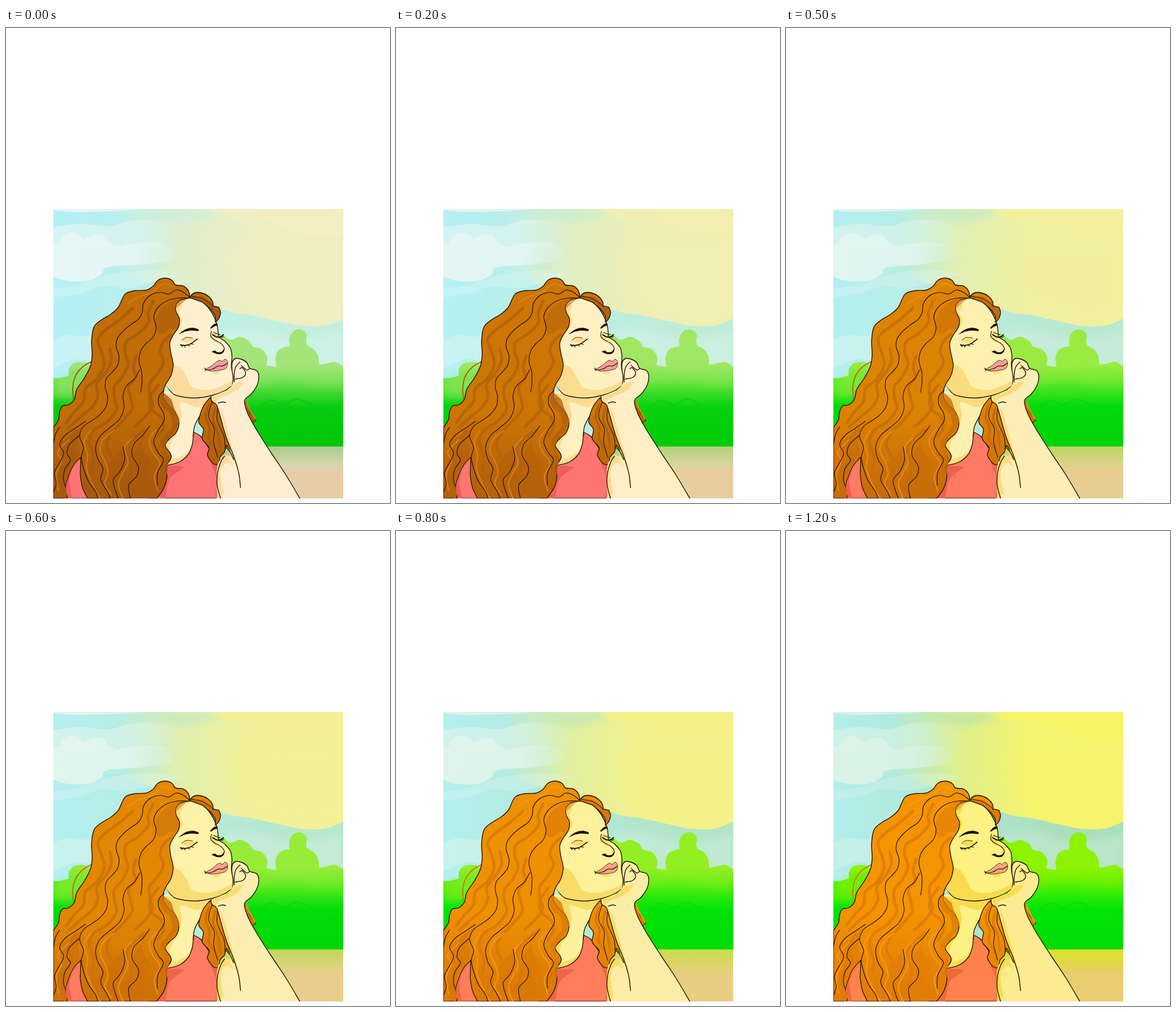
Animation, 673 px wide and 832 px high, one loop 3.2 s. Source, as an HTML page:

```html
<!DOCTYPE html>
<html lang="en">
<head>
<meta charset="utf-8">
<title>Sunlit portrait</title>
<style>
  html, body { margin: 0; width: 100%; height: 100%; overflow: hidden; background: #fff; }
  svg { display: block; width: 673px; height: 832px; }
</style>
</head>
<body>
<svg viewBox="0 0 673 832">
  <defs>
    <clipPath id="frame"><rect x="83" y="317" width="508" height="507"/></clipPath>
    <filter id="soft" x="-20%" y="-40%" width="140%" height="180%"><feGaussianBlur stdDeviation="7"/></filter>
  </defs>
  <g id="scene" clip-path="url(#frame)"></g>
</svg>
<script>
const NS = 'http://www.w3.org/2000/svg';
const LOOP = 3200, STEP = 100, STEPS = 12;

// name: cool colour, warm colour, share of the fade at which the warm one is reached
const palette = {
  skyLeft: ['#b5f0f5', '#b3eeec', 1],
  skyRight: ['#c3efdf', '#aadfbb', 1],
  warm: ['#eeeec3', '#f5f46e', 1],
  warmLight: ['#f4eec3', '#f8f365', 1],
  cloud: ['#e9f7f5', '#ddf3e6', 1],
  leafTop: ['#a3e578', '#8df204', 0.9],
  leafMid: ['#5ede42', '#42ef05', 0.8],
  leaf: ['#08cc10', '#00e408', 0.7],
  leafLow: ['#00c60a', '#00dc06', 0.7],
  groundTop: ['#a9cb8b', '#d9e32e', 1],
  groundMid: ['#d6d6ad', '#e3d153', 1],
  ground: ['#e6cda7', '#e9cd70', 1],
  hair: ['#c26d05', '#f39400', 0.75],
  hairLow: ['#a8590c', '#e17d05', 0.75],
  streak: ['#a65b10', '#dc7a0a', 0.75],
  glint: ['#d3801f', '#fa9f16', 0.75],
  skin: ['#fef0cd', '#fdf183', 1],
  arm: ['#feeecf', '#fbec92', 1],
  shade: ['#fbdc9c', '#f8dc4e', 1],
  shirt: ['#ff7477', '#ff824c', 1],
  shirtShade: ['#ee5b5e', '#ee6a39', 1],
  lips: ['#f49c9b', '#f6a97d', 1]
};

const rgb = hex => [1, 3, 5].map(i => parseInt(hex.slice(i, i + 2), 16));

function mix([from, to, full], p) {
  const end = rgb(to), k = Math.min(1, p / full);
  return `rgb(${rgb(from).map((v, i) => Math.round(v + (end[i] - v) * k))})`;
}

const paint = name => !name ? 'none' : name in palette ? `var(--${name})` : name;
const scene = document.getElementById('scene');

function add(tag, attrs, parent = scene) {
  const el = document.createElementNS(NS, tag);
  for (const key in attrs) el.setAttribute(key, attrs[key]);
  parent.append(el);
  return el;
}

// Smooth curve through points; "/" makes a corner
function curve(text) {
  return text.split('/').map((part, n) => {
    const p = part.trim().split(/\s+/).map(s => s.split(',').map(Number));
    const at = i => p[Math.max(0, Math.min(p.length - 1, i))];
    let d = (n ? 'L' : 'M') + p[0];
    for (let i = 0; i < p.length - 1; i++) {
      const c1 = at(i).map((v, k) => v + (at(i + 1)[k] - at(i - 1)[k]) / 6);
      const c2 = at(i + 1).map((v, k) => v - (at(i + 2)[k] - at(i)[k]) / 6);
      d += `C${c1} ${c2} ${at(i + 1)}`;
    }
    return d;
  }).join('');
}

function shape(fill, points, opacity = 1, outline = 0, filter = '') {
  return add('path', {
    d: curve(points) + 'Z', opacity,
    style: `fill:${paint(fill)};stroke:${outline ? INK : 'none'};stroke-width:${outline}`,
    ...(filter && { filter })
  });
}

const INK = '#201000';
function line(points, width = 1.4, color = INK, opacity = 1) {
  add('path', {
    d: curve(points), opacity, 'stroke-linecap': 'round', 'stroke-linejoin': 'round',
    style: `fill:none;stroke:${paint(color)};stroke-width:${width}`
  });
}
const lines = (list, ...look) => list.forEach(points => line(points, ...look));

function gradient(id, box, stops) {
  const [x1, y1, x2, y2] = box;
  const g = add('linearGradient', { id, x1, y1, x2, y2, gradientUnits: 'userSpaceOnUse' },
    document.querySelector('defs'));
  stops.forEach(([offset, color, alpha = 1]) =>
    add('stop', { offset, style: `stop-color:${paint(color)};stop-opacity:${alpha}` }, g));
}

gradient('sky', [83, 0, 480, 0], [[0, 'skyLeft'], [1, 'skyRight']]);
gradient('haze', [190, 0, 440, 0], [[0, 'warm', 0], [0.45, 'warm', 0.7], [1, 'warm']]);
gradient('mist', [83, 0, 310, 0], [[0, 'cloud'], [0.6, 'cloud', 0.9], [1, 'cloud', 0]]);
gradient('leaves', [0, 530, 0, 733], [[0, 'leafTop'], [0.3, 'leafTop'], [0.47, 'leafMid'], [0.66, 'leaf'], [1, 'leafLow']]);
gradient('land', [0, 733, 0, 776], [[0, 'groundTop'], [0.75, 'groundMid'], [1, 'ground']]);
gradient('locks', [0, 560, 0, 800], [[0, 'hair'], [0.45, 'hair'], [1, 'hairLow']]);

function drawSky() {
  add('rect', { x: 83, y: 317, width: 508, height: 507, fill: 'url(#sky)' });
  shape('url(#haze)', '190,317 / 591,317 / 591,509 560,521 520,522 480,514 430,503 400,499 370,489 330,466 280,455 230,440 190,420');
  shape('warmLight', '358,317 380,330 410,335 445,332 478,344 515,361 550,367 591,364 / 591,317', 0.75);
  shape('warmLight', '380,400 430,378 500,384 591,374 / 591,500 530,512 450,492 400,462', 0.35, 0, 'url(#soft)');
  shape('skyRight', '215,317 270,330 310,342 350,333 372,331 / 360,317', 0.5, 0, 'url(#soft)');
  shape('url(#mist)', '83,319 120,322 180,321 245,318 / 83,317');
  shape('url(#mist)', '83,349 130,343 180,347 230,336 290,342 330,360 / 300,384 210,381 / 83,386', 0.6);
  shape('url(#mist)', '83,379 92,377 99,365 114,358 128,362 137,370 151,363 169,363 180,376 196,382 220,378 270,377 300,391 / 290,406 240,414 178,419 168,431 148,442 122,444 98,441 83,435', 0.95);
  shape('cloud', '83,456 130,449 190,430 255,424 310,431 / 270,441 215,456 170,452 130,465 83,472', 0.3);
  shape('cloud', '83,546 108,538 145,540 190,530 / 190,600 130,580 83,596', 0.4);
  shape('cloud', '380,529 430,528 510,545 591,531 / 591,600 380,600', 0.3, 0, 'url(#soft)');
}

function drawPark() {
  shape('url(#leaves)', '83,613 94,613 110,609 / 110,597 117,588 130,585 143,587 152,596 / 200,733 83,733');
  shape('url(#leaves)', '350,545 375,536 393,546 410,541 426,548 433,558 449,563 458,577 456,591 / 474,594 / 472,579 477,565 488,559 497,558 / 496,546 499,537 507,529 519,529 527,537 526,549 528,556 / 540,563 547,574 549,590 / 561,588 577,585 591,593 / 591,733 350,733');
  shape('leafTop', '83,626 105,610 140,615 160,632 125,646 83,647', 0.55, 0, 'url(#soft)');
  shape('leafTop', '440,605 490,590 591,598 / 591,628 540,626 490,616 440,628', 0.35, 0, 'url(#soft)');
  lines(['445,663 465,652 486,660 510,650 534,660', '500,690 525,681 550,686 582,675'], 3, 'leafLow', 0.5);
  add('rect', { x: 83, y: 733, width: 508, height: 91, fill: 'url(#land)' });
}

function drawBody() {
  line('151,584 135,593 122,609 117,630 119,654', 2, 'streak');
  shape('hairLow', '414,650 423,661 428,674 438,687 433,691 437,706 / 417,672', 1, 1);
  line('421,655 427,669 436,684', 2.5, 'glint');

  // Neck and chest
  shape('skin', '270,636 / 362,640 345,670 331,700 328,735 310,756 280,768 / 265,740');
  shape('shade', '280,640 302,645 340,649 360,644 / 355,654 335,664 306,656 308,680 299,711 290,724 285,746 / 270,730');
  shape('shade', '330,708 322,737 307,750 283,758 / 283,768 310,762 325,744');
  line('358,648 344,672 331,696 328,715', 1.4);

  // Top
  shape('shirt', '329,708 341,715 355,735 368,754 374,780 371,824 / 255,824 / 283,766 304,760 320,746 327,728', 1, 1.3);
  shape('shirtShade', '283,768 298,767 313,769 / 303,776 287,790 281,812 279,824 / 258,824');
  shape('shirtShade', '353,735 365,750 374,775 371,824 / 367,824 369,790 360,765');

  // Hair behind the shoulder
  shape('url(#locks)', '357,648 346,662 340,678 338,691 346,703 344,720 356,735 353,748 363,763 373,764 375,752 383,743 / 386,731 396,743 / 391,725 383,700 378,661', 1, 1.3);
  lines(['356,659 350,680 357,701 355,718 367,739', '367,665 363,686 371,708 375,735'], 4, 'streak');
  lines(['361,655 355,680 365,702 364,725 371,752', '372,659 370,686 382,715 384,737'], 1.1);

  // Arm and fist
  shape('arm', '359,650 369,661 375,679 386,717 399,750 / 382,753 374,768 371,790 370,824 / 515,824 490,782 464,743 441,707 424,676 418,653 / 430,641 440,626 443,610 439,600 427,596 / 422,586 412,580 402,579 396,588 398,617 / 388,635 363,643');
  shape('shade', '374,662 382,680 397,735 410,775 / 399,755 385,752 376,767 373,790 378,824 / 370,824 370,770 379,754 395,748');
  shape('shade', '360,644 385,637 404,622 417,620 / 407,633 393,641 375,648 367,658');
  shape('shade', '383,748 390,751 399,769 / 391,762 382,764 376,781 381,815 / 370,824 371,777');
  lines([
    '359,646 361,655 369,660 375,679 386,717 399,750 408,780 411,805',
    '397,616 396,588 402,579 412,580 422,586 427,596 439,600 443,610 440,626 430,641 418,653 424,676 441,707 464,743 490,782 515,824',
    '400,620 400,606 403,593 410,585', '410,597 414,595 420,604 415,612 402,615',
    '412,591 422,599 427,596', '372,657 379,655 385,656',
    '386,735 393,743 399,756', '376,824 370,800 371,778 377,759 383,750'
  ], 1.4);
}

function drawFace() {
  shape('skin', '322,472 343,479 357,493 367,511 371,525 372,541 / 383,548 393,560 396,575 395,592 398,613 395,626 383,635 363,643 332,648 300,644 289,637 280,624 / 270,600 280,550 295,480', 1, 1.4);
  shape('shade', '289,566 291,586 306,595 317,612 327,629 352,634 378,627 397,617 / 396,626 382,635 362,642 332,646 300,643 288,635 276,620');
  shape('shade', '297,486 305,481 309,487 304,498 309,512 306,522 / 294,538 290,520');
  shape('shade', '307,548 315,541 327,543 331,547 318,552');
  shape('shade', '361,602 372,601 376,604 365,607');
  shape('shade', '362,530 360,540 364,549 376,553 / 369,545 368,536');
  line('308,547 316,542 327,543', 0.8);

  // Brows, eyes, nose
  shape(INK, '302,537 314,528 327,525 338,528 / 337,531 325,530 313,532');
  shape(INK, '358,525 364,519 370,517 / 371,521 365,523 359,527');
  line('306,555 314,556 324,553 335,545', 1.8);
  lines(['306,555 309,558', '311,555 314,559', '318,555 322,557', '323,553 329,554'], 1.2);
  line('362,537 369,541 376,541 381,537', 2);
  lines(['374,541 380,542', '376,540 382,540', '364,533 371,536 375,537'], 1.1);
  line('360,531 359,540 365,546 376,552 382,559 382,565 377,569', 1.2);
  shape(INK, '360,567 366,565 371,568 378,567 382,562 / 382,567 377,571 369,571');

  // Mouth
  shape('lips', '349,598 360,592 370,584 375,582 379,584 384,580 388,584 388,591 384,597 372,600 358,601', 1, 0.8);
  line('348,597 353,599 363,597 372,592 380,592 388,587', 1.2);
  line('348,595 350,598 349,601', 1);
}

function drawHair() {
  // Lock over the far temple
  shape('streak', '321,472 330,464 343,464 355,470 362,479 363,487 / 373,489 376,498 373,509 367,515 / 367,505 359,493 344,480', 1, 1.4);
  line('323,470 342,473 356,481 363,488', 1);
  line('331,468 346,469 358,478', 4, 'hair');

  shape('url(#locks)', '83,700 92,686 94,672 99,662 110,660 120,650 124,633 138,612 148,592 151,572 150,548 154,524 166,512 184,501 197,489 203,476 210,465 226,460 246,459 258,452 266,442 279,438 291,442 297,450 311,452 320,461 322,473 / 306,476 298,485 298,497 304,510 302,524 293,538 287,552 289,570 293,590 289,609 281,622 276,634 / 276,648 284,660 297,673 303,692 298,709 287,719 279,731 288,745 289,754 280,769 282,786 276,807 264,824 / 83,824', 1, 1.4);

  shape('streak', '319,473 301,474 281,485 268,498 261,516 265,533 276,535 287,527 298,528 / 303,515 297,492', 0.5);
  shape('hairLow', '290,651 274,638 268,648 275,665 287,675 291,696 281,711 270,727 279,748 269,776 279,798 / 286,754 279,731 303,692 297,673', 0.8);
  shape('hairLow', '252,698 238,718 241,741 255,760 244,785 250,824 / 219,824 231,785 221,754 234,728', 0.65);
  shape('hairLow', '207,735 193,748 178,770 188,798 184,824 / 208,824 198,800 208,777', 0.65);
  shape('hairLow', '137,694 117,711 94,731 102,752 91,783 102,824 / 115,824 110,785 128,751 126,723', 0.65);

  lines([
    '222,491 198,512 172,531 161,547 168,569 172,590 160,614 139,632 136,654 121,671 106,691',
    '258,478 249,499 250,515 231,536 211,549 208,568 214,588 204,611 190,628 190,648 194,667 177,690 155,704 146,724 154,752 151,775',
    '289,537 276,549 270,566 276,585 265,606 252,622 252,643 257,662 243,682 226,698',
    '228,575 223,594 227,612 215,628 219,650 221,667 203,690 183,711 176,731 185,751',
    '182,562 185,582 176,602 159,624 161,645 151,664 132,680 111,699',
    '267,625 253,646 254,667 271,681 276,699 266,716', '243,704 218,726 212,747 220,768 214,792 202,810',
    '122,706 108,733 117,753 101,774 99,797 108,819'
  ], 5, 'streak', 0.8);
  lines([
    '189,705 170,721 165,741 174,760 179,780 173,798 185,818', '222,718 208,735 214,760 204,781 197,800 205,824',
    '263,703 251,721 257,743 270,762 260,785 266,811', '148,705 137,724 143,748 141,772 151,798 165,824',
    '111,721 91,742 97,759 88,782 92,810', '214,482 232,471 255,463 276,448 291,453'
  ], 2.4, 'glint', 0.8);

  lines([
    '322,472 311,463 298,459 285,466 271,463 257,466 246,474 240,485 239,497 232,510 218,520 205,531 195,544 193,558 198,574 196,590 187,602 176,614 174,630 178,645 176,662 165,677 150,688 136,698 129,715 136,735 132,752 137,775 145,795 157,812 161,824',
    '319,473 301,473 282,478 266,490 259,506 263,524 258,541 245,553 236,566 233,583 238,604 238,624 236,638',
    '234,599 225,615 211,627 205,645 207,665 199,685 182,700 165,715 157,735 161,755 170,772 166,791 177,811 183,824',
    '277,635 268,645 268,660 276,674 277,688 266,706 259,725 267,744 276,757 266,778 265,801',
    '252,697 239,714 224,729 221,749 232,768 229,785 215,801 218,824',
    '205,733 208,755 200,776 188,791 191,808 197,824',
    '139,689 120,702 104,713 94,729 101,745 94,761 85,779 88,798 83,814',
    '128,714 111,730 107,746 113,757 103,773 101,793 108,812 106,824', '94,699 87,711 83,730'
  ], 1.2);

  shape('shirt', '131,752 119,765 110,784 105,804 112,824 / 143,824 134,805 130,783', 1, 1.2);
  shape('shirtShade', '129,757 118,772 111,794 116,824 / 109,824 105,804 111,783');
}

drawSky();
drawPark();
drawBody();
drawFace();
drawHair();

const colorsAt = p => Object.fromEntries(
  Object.entries(palette).map(([name, pair]) => ['--' + name, mix(pair, p)]));

const frames = Array.from({ length: STEPS + 1 }, (_, i) => (
  { offset: i * STEP / LOOP, easing: 'step-end', ...colorsAt(i / STEPS) }));
frames.push({ offset: 1, ...colorsAt(1) });
document.documentElement.animate(frames, { duration: LOOP, iterations: Infinity });
</script>
</body>
</html>
```
